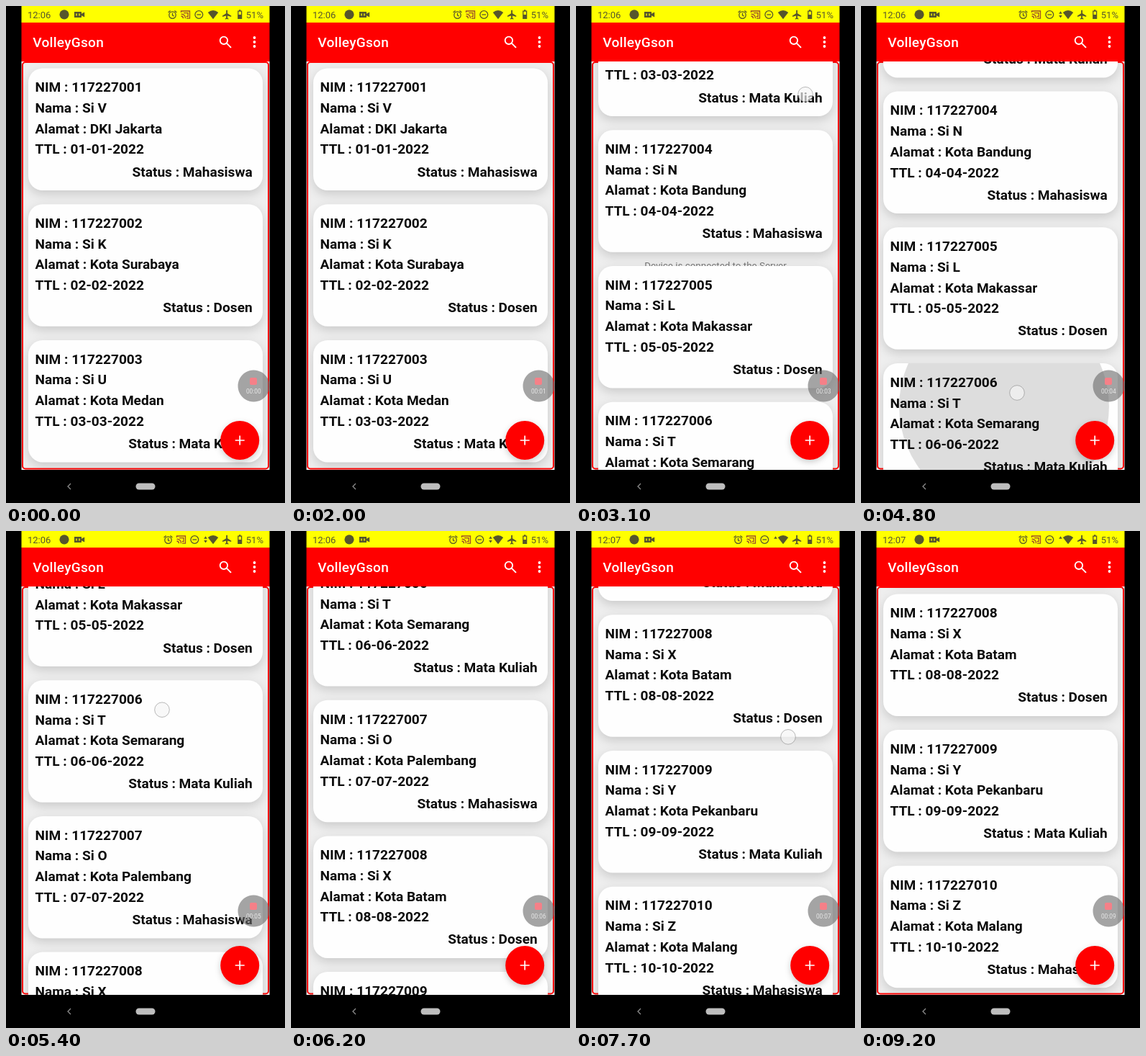
Recreate the animation shown at these times as an HTML page. Size 388 by 690 pixels, loop 9.3 s.

```html
<!DOCTYPE html>
<html lang="id">
<head>
<meta charset="utf-8">
<title>VolleyGson</title>
<style>
html, body { margin: 0; width: 100%; height: 100%; overflow: hidden; background: #000; }
svg { display: block; width: 100%; height: 100%; font-family: Roboto, Arial, sans-serif; }
.card { fill: #fefefe; filter: drop-shadow(0 5px 7px rgba(0,0,0,.15)); }
.row { font-size: 19.1px; font-weight: 700; fill: #0b0b0b; }
.fab { fill: #f00; filter: drop-shadow(0 3px 4px rgba(0,0,0,.2)); }
.end { text-anchor: end; }
.mid { text-anchor: middle; }
.line { fill: none; stroke: #56562c; stroke-width: 1.3; }
.ink { fill: #56562c; }
</style>
</head>
<body>
<svg viewBox="0 0 388 690">
  <defs>
    <clipPath id="view"><rect x="21.5" y="77" width="345" height="567"/></clipPath>
    <clipPath id="pressed"><rect x="31" y="1030" width="326" height="169.5" rx="20"/></clipPath>
  </defs>
  <rect width="388" height="690"/>
  <rect x="21.5" y="77" width="345" height="567" fill="#fff"/>
  <rect x="23" y="78" width="342" height="564.5" rx="4" fill="#eee" stroke="#f00" stroke-width="2"/>
  <text class="mid" x="194" y="365" font-size="13.4" fill="#777">Device is connected to the Server</text>
  <g clip-path="url(#view)">
    <g id="list">
      <g id="cards"></g>
      <g clip-path="url(#pressed)"><circle id="ripple" cx="199" cy="1090" r="0"/></g>
      <g id="rows" class="row"></g>
    </g>
  </g>

  <rect x="21.5" y="23" width="345" height="54" fill="#f00"/>
  <text x="37.3" y="57" font-size="19.1" font-weight="500" letter-spacing=".24" fill="#fff">VolleyGson</text>
  <g fill="none" stroke="#fff" stroke-width="1.9">
    <circle cx="302.9" cy="47.8" r="5.2"/>
    <path d="M306.8 51.7L313 57.9"/>
  </g>
  <g fill="#fff">
    <circle cx="345.5" cy="44" r="1.9"/><circle cx="345.5" cy="50" r="1.9"/><circle cx="345.5" cy="56" r="1.9"/>
  </g>

  <rect x="21.5" width="345" height="23" fill="#ff0"/>
  <g class="ink">
    <text id="clock" x="30" y="16.6" font-size="13"></text>
    <text x="333.8" y="16.6" font-size="13">51%</text>
    <circle cx="81" cy="11.8" r="6.6"/>
    <path d="M288 18.3L280.8 9Q288 3 295.2 9Z"/>
    <path d="M306.2 6.3q.9-1.6 1.8 0v4l5.2 3.3v1.5l-5.2-1.6v3l1.4 1v1l-2.3-.6-2.3.6v-1l1.4-1v-3l-5.2 1.6v-1.5l5.2-3.3z"/>
    <path d="M95 8h10v2.8l4.2-2.4v7.2l-4.2-2.4V16H95z"/>
    <path id="up" d="M275.2 10.8l2.3-3.6 2.3 3.6z"/>
    <path id="down" d="M275.2 13l2.3 3.6 2.3-3.6z"/>
  </g>
  <path d="M97 10.4h2v3.2h-2zM101 10.4h2v3.2h-2z" fill="#ff0" fill-opacity=".7"/>
  <g class="line">
    <path d="M322.8 7.2h4.8v10.2h-4.8zM324 6h2.4"/>
    <path d="M323 14.5h4.4" stroke-width="5"/>
  </g>
  <g class="line" id="tray">
    <circle cx="231.5" cy="12.6" r="4.7"/>
    <path d="M231.5 9.8v3l2 1.3M225.6 8.9l3-2.5M237.4 8.9l-3-2.5"/>
    <g stroke="#9a4c2c">
      <path d="M243.5 9V7h12v10.2h-4.5M243.5 11.2q5.8.2 6 6M243.5 14q2.9.2 3 3.2"/>
      <path d="M247 9.6h6v5h-2.4"/>
    </g>
    <circle cx="268.3" cy="12" r="5.4"/>
    <path d="M265.4 12h5.8"/>
  </g>

  <rect x="21.5" y="644" width="345" height="46"/>
  <path d="M90 663l-4 4 4 4" fill="none" stroke="#8c8c8c" stroke-width="1.3"/>
  <rect x="180.5" y="662.5" width="27" height="9" rx="4.5" fill="#bdbdbd"/>

  <circle class="fab" cx="325.2" cy="603" r="27"/>
  <path d="M318.7 603h13M325.2 596.5v13" stroke="#fff" stroke-width="1.7"/>
  <path d="M366.5 528a22 22 0 1 1 0-1z" fill="#6a6a6a" fill-opacity=".6"/>
  <rect x="339" y="516" width="10" height="10" rx="2" fill="#f58088"/>
  <text id="timer" class="mid" x="344.3" y="537.6" font-size="8.3" fill="#e8e8e8"></text>
  <circle id="finger" r="10.3" fill="#f4f4f4" fill-opacity=".68" stroke="#777" stroke-opacity=".5"/>
</svg>
<script>
const LOOP = 9300, PITCH = 188.7;
const $ = id => document.getElementById(id);
const initials = 'VKUNLTOXYZ';
const cities = ['DKI Jakarta', 'Kota Surabaya', 'Kota Medan', 'Kota Bandung', 'Kota Makassar',
  'Kota Semarang', 'Kota Palembang', 'Kota Batam', 'Kota Pekanbaru', 'Kota Malang'];
const roles = ['Mahasiswa', 'Dosen', 'Mata Kuliah'];

// time, scroll offset, speed in px per ms
const scrollKeys = [[2400, 0, 0], [3100, 480, .3], [3600, 534, 0], [4850, 534, 0], [5500, 880, .5],
  [6000, 984, 0], [6850, 984, 0], [7700, 1291, .15], [8100, 1320, 0]];
// down, up, x, y at contact, scroll at contact
const touches = [[2330, 3150, 319, 603, 0], [4550, 5520, 217, 537, 534], [6750, 8100, 295, 593, 984]];

const pad = n => String(n).padStart(2, '0');
const clamp = v => Math.max(0, Math.min(1, v));

let cards = '', rows = '';
cities.forEach((city, i) => {
  const top = 86.5 + i * PITCH, n = pad(i + 1);
  cards += `<rect class="card" x="31" y="${top}" width="326" height="169.5" rx="20"/>`;
  [`NIM : ${117227001 + i}`, `Nama : Si ${initials[i]}`, `Alamat : ${city}`, `TTL : ${n}-${n}-2022`]
    .forEach((s, k) => rows += `<text x="40.5" y="${top + 32.8 + k * 28.7}">${s}</text>`);
  rows += `<text class="end" x="342.7" y="${top + 150}">Status : ${roles[i % 3]}</text>`;
});
$('cards').innerHTML = cards;
$('rows').innerHTML = rows;

function scrollAt(t) {
  const k = scrollKeys.findIndex(p => p[0] > t);
  if (k === 0) return 0;
  if (k < 0) return scrollKeys[scrollKeys.length - 1][1];
  const [t0, a, va] = scrollKeys[k - 1], [t1, b, vb] = scrollKeys[k];
  const h = t1 - t0, u = (t - t0) / h, w = 1 - u;
  return a * w * w * (1 + 2 * u) + b * u * u * (3 - 2 * u) + h * u * w * (va * w - vb * u);
}

function show(el, on) { el.setAttribute('visibility', on ? 'visible' : 'hidden'); }

function draw(t) {
  const y = scrollAt(t);
  $('list').setAttribute('transform', `translate(0 ${-y})`);

  const touch = touches.find(p => t >= p[0] && t < p[1]);
  show($('finger'), touch);
  if (touch) {
    $('finger').setAttribute('cx', touch[2]);
    $('finger').setAttribute('cy', touch[3] - (y - touch[4]));
  }

  const grow = clamp((t - 4650) / 300);
  $('ripple').setAttribute('r', 290 * grow);
  $('ripple').setAttribute('opacity', t < 4650 ? 0 : .13 * (1 - clamp((t - 4900) / 250)));

  const busy = t >= 4000;
  $('tray').setAttribute('transform', `translate(${busy ? -6 : 0} 0)`);
  show($('up'), busy);
  show($('down'), busy && t < 7000);
  $('clock').textContent = t < 7000 ? '12:06' : '12:07';
  $('timer').textContent = '00:' + pad(Math.max(0, Math.floor((t - 50) / 1000)));
}

const start = performance.now();
function tick() {
  draw((performance.now() - start) % LOOP);
  requestAnimationFrame(tick);
}
tick();
</script>
</body>
</html>
```
